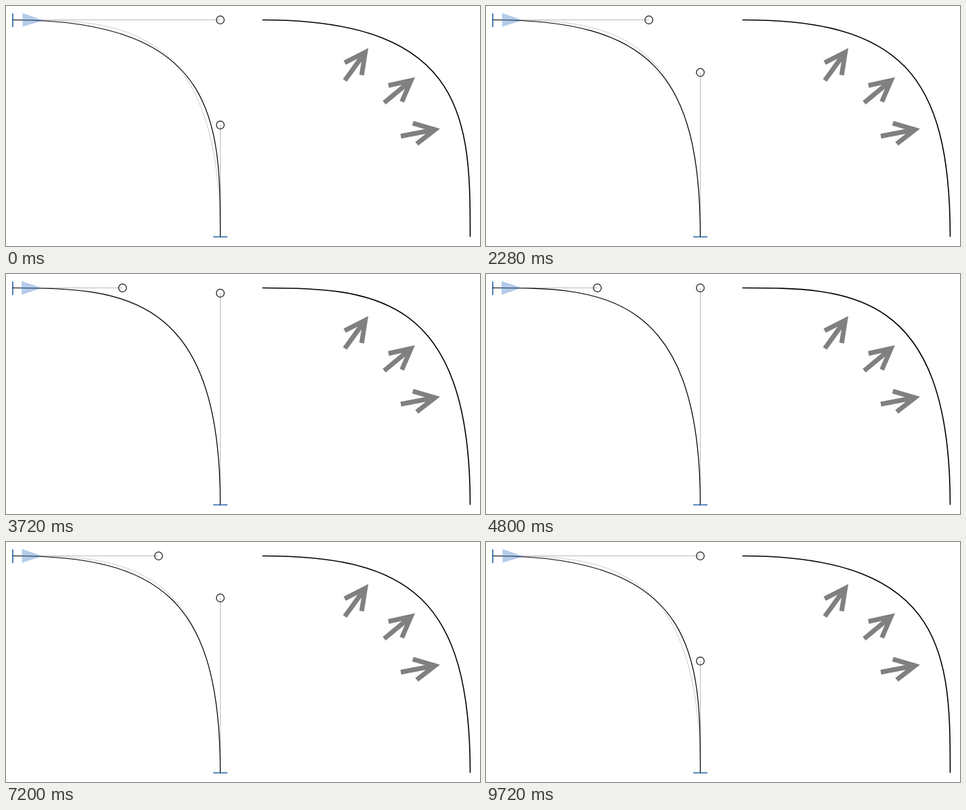
An HTML page that plays this animation: 700 by 354 pixels, repeating every 9.84 s.

```html
<!DOCTYPE html>
<html lang="en">
<head>
<meta charset="utf-8">
<title>Curve handles</title>
<style>
  html, body { margin: 0; width: 100%; height: 100%; overflow: hidden; background: #fff; }
  svg { display: block; width: 700px; height: 354px; }
  path, line, circle { fill: none; }
  .rest { stroke: #ccc; }
  .guide { stroke: #bbb; }
  .curve { stroke: #000; stroke-width: 1.2; }
  .bold { stroke: #000; stroke-width: 1.6; }
  .knob { stroke: #222; stroke-width: 1.3; }
  .stop { stroke: #4f81bd; stroke-width: 2; }
  .marker { fill: #447dc8; fill-opacity: .4; }
  .arrow { stroke: #808080; stroke-width: 7; }
</style>
</head>
<body>
<svg viewBox="0 0 700 354">
  <defs>
    <path id="arrow" class="arrow" d="M-59 0H-7M-38 -15.5L-7.6 0L-38 15.5"/>
  </defs>

  <path class="rest" id="rest"/>
  <line class="guide" id="guideX" x1="9.5" y1="20.5" y2="20.5"/>
  <line class="guide" id="guideY" x1="316.5" x2="316.5" y2="340.5"/>
  <path class="stop" d="M10 11V31M306 340.5H327"/>
  <path class="curve" id="left"/>
  <path class="marker" id="marker"/>
  <circle class="knob" id="knobX" cy="20.5" r="5.8"/>
  <circle class="knob" id="knobY" cx="316.5" r="5.8"/>

  <path class="bold" id="right" transform="translate(369 0)"/>
  <use href="#arrow" transform="translate(535 62) rotate(-54.1)"/>
  <use href="#arrow" transform="translate(604 105) rotate(-39.6)"/>
  <use href="#arrow" transform="translate(641 181) rotate(-10.7)"/>
</svg>
<script>
  const LOOP = 9840, TICK = 120;
  const STEPS = 20, STEP_MS = 150;
  const OUT_AT = 930, BACK_AT = 6075;

  const el = id => document.getElementById(id);
  const set = (id, attrs) => {
    for (const name in attrs) el(id).setAttribute(name, attrs[name]);
  };
  const mix = (a, b, k) => a + (b - a) * k;

  // Twenty equal jumps, the first one at the given time
  const ramp = (t, start) => {
    const n = Math.floor((t - start) / STEP_MS) + 1;
    return Math.min(STEPS, Math.max(0, n)) / STEPS;
  };

  const handles = k => ({ x: mix(316.5, 164.5, k), y: mix(175.5, 20.5, k) });
  const curve = h => `M9.5 20.5C${h.x} 20.5 316.5 ${h.y} 316.5 340.5`;

  function draw(t) {
    const k = ramp(t, OUT_AT) - ramp(t, BACK_AT);
    const h = handles(k);
    const d = curve(h);
    const base = mix(24.5, 23, k), tip = mix(55.5, 53.5, k);
    set('left', { d });
    set('right', { d });
    set('guideX', { x2: h.x });
    set('guideY', { y1: h.y });
    set('knobX', { cx: h.x });
    set('knobY', { cy: h.y });
    set('marker', { d: `M${base} 10.5L${tip} ${mix(21.2, 20.6, k)}L${base} 30.5Z` });
  }

  set('rest', { d: curve(handles(1)) });
  draw(0);

  const begin = performance.now();
  function frame() {
    const t = (performance.now() - begin) % LOOP;
    draw(Math.floor(t / TICK) * TICK);
    requestAnimationFrame(frame);
  }
  requestAnimationFrame(frame);
</script>
</body>
</html>
```
